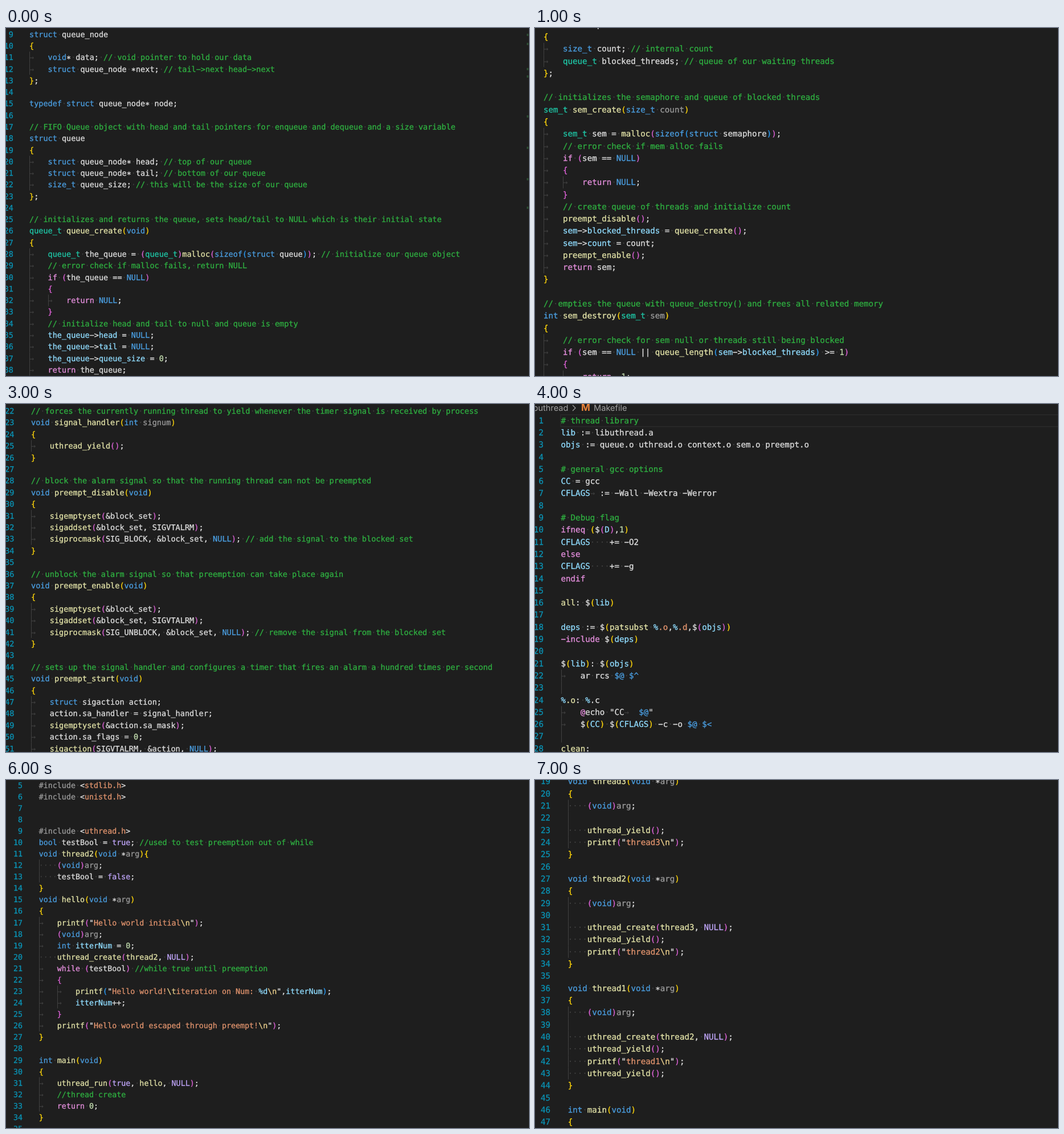
Animation, 918 px wide and 610 px high, one loop 8000 ms. Source, as an HTML page with a canvas:

```html
<!DOCTYPE html>
<html lang="en">
<head>
<meta charset="utf-8">
<title>Code slides</title>
<style>
html, body { margin: 0; width: 100%; height: 100%; overflow: hidden; background: #1e1e1e; }
canvas { display: block; }
</style>
</head>
<body>
<canvas id="stage" width="918" height="610"></canvas>
<script>
const ctx = document.getElementById('stage').getContext('2d');
const SLIDE_MS = 1000;

const color = {
  plain: '#dedede', comment: '#2fb041', keyword: '#4a9ddf', control: '#e58fdd', type: '#1fc6a6',
  call: '#e3e3a8', member: '#90dcfe', text: '#e0936d', escape: '#ecd08c', number: '#c2dcae',
  faded: '#9a9a9a', violet: '#bfa5f8', blank: '#414141', lineNo: '#0a93b5'
};
const brackets = ['#ffd60a', '#dc62d6', '#2a9cf5'];

// Ordered [style, pattern] pairs; the first match at a position wins.
const grammar = rules => ({
  styles: rules.map(rule => rule[0]),
  pattern: new RegExp(rules.map(rule => `(${rule[1].source})`).join('|'), 'g')
});

const cLang = grammar([
  ['comment', /\/\/.*/],
  ['string', /"[^"]*"/],
  ['text', /(?<=<)\w+\.h(?=>)/],
  ['faded', /#\w+|\barg\b/],
  ['control', /\b(?:if|else|while|for|return)\b/],
  ['keyword', /\b(?:struct|typedef|void|int|bool|static|sizeof|size_t)\b/],
  ['constant', /\b(?:NULL|true|false)\b/],
  ['type', /\b(?:queue_t|sem_t|sigset_t)\b/],
  ['call', /\b\w+(?=\()|\bthread\d\b|\bhello\b/],
  ['faded', /(?<=^\w.*)\b\w+(?=\)$)/],
  ['member', /\b\w+(?=->)|(?<=->)\w+|\bitterNum\b/],
  ['number', /\b\d+\b/],
  ['bracket', /[(){}]/],
  ['plain', /\w+|[^\w]/]
]);

const makeLang = grammar([
  ['comment', /#.*/],
  ['control', /^(?:ifneq|else|endif|-include)|@(?=echo)/],
  ['keyword', /\$[@^<]/],
  ['call', /^\w+(?=:)|(?<=^%)\.o|patsubst/],
  ['member', /^\w+|(?<=\$\()\w+|%/],
  ['text', /(?<=%)\.[od](?=,)/],
  ['number', /\b1\b/],
  ['bracket', /[()]/],
  ['plain', /\w+|[^\w]/]
]);

// In the listings an arrow stands for a tab.
const slides = [
  { first: 9, x: 41, numX: 13, y: 15.7, pitch: 20.28, cell: 8.13, lang: cLang, extra: drawMinimapEdge, code: String.raw`struct queue_node
{
→void* data; // void pointer to hold our data
→struct queue_node *next; // tail->next head->next
};

typedef struct queue_node* node;

// FIFO Queue object with head and tail pointers for enqueue and dequeue and a size variable
struct queue
{
→struct queue_node* head; // top of our queue
→struct queue_node* tail; // bottom of our queue
→size_t queue_size; // this will be the size of our queue
};

// initializes and returns the queue, sets head/tail to NULL which is their initial state
queue_t queue_create(void)
{
→queue_t the_queue = (queue_t)malloc(sizeof(struct queue)); // initialize our queue object
→// error check if malloc fails, return NULL
→if (the_queue == NULL)
→{
→→return NULL;
→}
→// initialize head and tail to null and queue is empty
→the_queue->head = NULL;
→the_queue->tail = NULL;
→the_queue->queue_size = 0;
→return the_queue;` },

  { x: 15, y: -1.2, pitch: 21.27, cell: 8.514, lang: cLang, code: String.raw`struct semaphore
{
→size_t count; // internal count
→queue_t blocked_threads; // queue of our waiting threads
};

// initializes the semaphore and queue of blocked threads
sem_t sem_create(size_t count)
{
→sem_t sem = malloc(sizeof(struct semaphore));
→// error check if mem alloc fails
→if (sem == NULL)
→{
→→return NULL;
→}
→// create queue of threads and initialize count
→preempt_disable();
→sem->blocked_threads = queue_create();
→sem->count = count;
→preempt_enable();
→return sem;
}

// empties the queue with queue_destroy() and frees all related memory
int sem_destroy(sem_t sem)
{
→// error check for sem null or threads still being blocked
→if (sem == NULL || queue_length(sem->blocked_threads) >= 1)
→{
→→return -1;` },

  { first: 48, x: 44, numX: 14.5, y: 19, pitch: 20.44, cell: 8.216, lang: cLang, code: String.raw`// yields out of curr_thread into next READY thread in thread_lib
void uthread_yield(void)
{
→struct uthread_tcb* current = curr_thread;
→preempt_disable();

→if(current->state == RUNNING)
→{
→→current->state = READY; // change state of the thread being switched out of to READY from RUNNING
→→queue_enqueue(thread_lib, curr_thread); // add the thread that was RUNNING to READY queue

→}

→prev_thread = current; // set prev thread to current
→queue_dequeue(thread_lib, (void**) &next_thread); // get the oldest thread
→curr_thread = next_thread;
→current = next_thread;
→current->state = RUNNING; // current thread is now running

→uthread_ctx_switch(prev_thread->context, current->context); // use private context.c function to switch threads

→// check if state is Zombie 
→if(current->state == ZOMBIE)
→{
→→free(current);
→}→
→preempt_enable();
}

// called at the end of a thread's context in that it reached the end of its code, marks curr_thread as zombie` },

  { first: 22, x: 44, numX: 14.5, y: 17, pitch: 20.4, cell: 8.18, lang: cLang, code: String.raw`// forces the currently running thread to yield whenever the timer signal is received by process
void signal_handler(int signum)
{
→uthread_yield();
}

// block the alarm signal so that the running thread can not be preempted
void preempt_disable(void)
{
→sigemptyset(&block_set);
→sigaddset(&block_set, SIGVTALRM);
→sigprocmask(SIG_BLOCK, &block_set, NULL); // add the signal to the blocked set
}

// unblock the alarm signal so that preemption can take place again
void preempt_enable(void)
{
→sigemptyset(&block_set);
→sigaddset(&block_set, SIGVTALRM);
→sigprocmask(SIG_UNBLOCK, &block_set, NULL); // remove the signal from the blocked set
}

// sets up the signal handler and configures a timer that fires an alarm a hundred times per second
void preempt_start(void)
{
→struct sigaction action;
→action.sa_handler = signal_handler;
→sigemptyset(&action.sa_mask);
→action.sa_flags = 0;
→sigaction(SIGVTALRM, &action, NULL);` },

  { first: 1, x: 45.5, numX: 15, y: 33.6, pitch: 21.3, cell: 8.54, lang: makeLang, extra: drawBreadcrumb, code: String.raw`# thread library
lib := libuthread.a
objs := queue.o uthread.o context.o sem.o preempt.o

# general gcc options
CC = gcc
CFLAGS→:= -Wall -Wextra -Werror

# Debug flag
ifneq ($(D),1)
CFLAGS    += -O2
else
CFLAGS    += -g
endif

all: $(lib)

deps := $(patsubst %.o,%.d,$(objs))
-include $(deps)

$(lib): $(objs)
→ar rcs $@ $^

%.o: %.c
→@echo "CC→$@"
→$(CC) $(CFLAGS) -c -o $@ $<

clean:` },

  { first: 12, x: 58, numX: 29, y: 13, pitch: 21.3, cell: 8.52, lang: cLang, macros: true, code: String.raw`void test_create(void)
{
→queue_t q = queue_create();
→assert(q != NULL);
}

void test_queue_simple(void)
{
→int data = 3, *ptr;
→queue_t q = queue_create();

→queue_enqueue(q, &data);
→queue_dequeue(q, (void**)&ptr);
→assert(ptr == &data);
}

void test_destroy(void)
{
→queue_t q = queue_create();
→assert(queue_destroy(q) == 0);
}

int main(void)
{
→test_create();
→test_queue_simple();
→test_destroy();
→return 0;
}` },

  { first: 5, x: 57.7, numX: 29, y: 13.6, pitch: 20.08, cell: 8.03, lang: cLang, macros: true, code: String.raw`#include <stdlib.h>
#include <unistd.h>


#include <uthread.h>
bool testBool = true; //used to test preemption out of while
void thread2(void *arg){
    (void)arg;
    testBool = false;
}
void hello(void *arg)
{
→printf("Hello world initial\n");
→(void)arg;
→int itterNum = 0;
    uthread_create(thread2, NULL);
→while (testBool) //while true until preemption
→{
→→printf("Hello world!\titeration on Num: %d\n",itterNum);
→→itterNum++;
→}
→printf("Hello world escaped through preempt!\n");
}

int main(void)
{
→uthread_run(true, hello, NULL);
→//thread create
→return 0;
}
` },

  { first: 19, x: 57.7, numX: 27, y: 7.3, pitch: 21.32, cell: 8.53, lang: cLang, macros: true, code: String.raw`void thread3(void *arg)
{
    (void)arg;

    uthread_yield();
    printf("thread3\n");
}

void thread2(void *arg)
{
    (void)arg;

    uthread_create(thread3, NULL);
    uthread_yield();
    printf("thread2\n");
}

void thread1(void *arg)
{
    (void)arg;

    uthread_create(thread2, NULL);
    uthread_yield();
    printf("thread1\n");
    uthread_yield();
}

int main(void)
{` }
];

function drawMinimapEdge() {
  ctx.fillStyle = '#2b4a31';
  for (const y of [12, 28, 72, 85, 155, 210, 265, 315]) ctx.fillRect(914, y - 2, 3, 4);
}

function drawBreadcrumb() {
  ctx.strokeStyle = '#2a2a2a';
  ctx.lineWidth = 1.5;
  ctx.strokeRect(45, 18.8, 900, 20.8);
  ctx.font = '14.6px Inter, sans-serif';
  ctx.fillStyle = '#a2a2a2';
  ctx.textAlign = 'right';
  ctx.fillText('libuthread', 58.5, 12);
  ctx.textAlign = 'left';
  ctx.fillText('Makefile', 103, 12);
  ctx.strokeStyle = '#a2a2a2';
  ctx.lineWidth = 1.2;
  ctx.stroke(new Path2D('M66 2 l5 5 l-5 5'));
  ctx.font = 'bold 17px Inter, sans-serif';
  ctx.fillStyle = '#e8823a';
  ctx.fillText('M', 81, 12);
}

// Wide hyphens and centred asterisks, as in the editor's typeface.
const glyphs = { '-': '\u2212', '*': '\u2217', ' ': '·' };

function drawGlyph(char, x, y, fill) {
  ctx.fillStyle = ctx.strokeStyle = fill;
  const glyph = glyphs[char] || char;
  ctx.fillText(glyph, x, y);
  if (char !== ' ' && char !== '→') ctx.strokeText(glyph, x, y);
}

function styleOfStringPart(part) {
  if (part === '"') return 'plain';
  return part[0] === '\\' ? 'escape' : part[0] === '%' ? 'member' : 'text';
}

// Splits a line into [text, colour] pieces; nesting carries bracket depth across lines.
function tokenize(line, slide, nesting) {
  const pieces = [];
  for (const match of line.matchAll(slide.lang.pattern)) {
    const token = match[0];
    const style = slide.lang.styles[match.slice(1).findIndex(group => group !== undefined)];
    if (style === 'string') {
      for (const part of token.match(/\\.|%\w|"|[^\\%"]+/g)) pieces.push([part, color[styleOfStringPart(part)]]);
    } else if (style === 'bracket') {
      const depth = '({'.includes(token) ? nesting.depth++ : --nesting.depth;
      pieces.push([token, brackets[depth % 3]]);
    } else if (style === 'constant') {
      pieces.push([token, slide.macros ? color.violet : color.keyword]);
    } else {
      pieces.push([token, color[style]]);
    }
  }
  return pieces;
}

function indentLevel(lines, row) {
  const own = line => line.match(/^(?:→| {4})*/)[0].replace(/ {4}/g, '→').length;
  if (lines[row]) return own(lines[row]);
  const above = own(lines.slice(0, row).reverse().find(Boolean) || '');
  const below = own(lines.slice(row).find(Boolean) || '');
  return Math.min(above, below) + (above !== below ? 1 : 0);
}

function drawSlide(slide) {
  const { x, y, pitch, cell, numX, first } = slide;
  const lines = slide.code.split('\n');
  const nesting = { depth: 0 };
  ctx.fillStyle = '#1e1e1e';
  ctx.fillRect(0, 0, 918, 610);
  if (slide.extra) slide.extra();

  ctx.font = `${cell / 0.602}px "DejaVu Sans Mono", monospace`;
  ctx.textRendering = 'geometricPrecision';
  ctx.lineWidth = 0.3;
  lines.forEach((line, row) => {
    const base = y + row * pitch;
    ctx.fillStyle = color.blank;
    for (let level = 0; level < indentLevel(lines, row); level++) {
      ctx.fillRect(Math.round(x + level * 4 * cell), base - 4.7 - pitch / 2, 1, pitch);
    }
    if (first) {
      const label = String(first + row);
      [...label].forEach((digit, i) =>
        drawGlyph(digit, numX - (label.length - i) * cell, base, color.lineNo));
    }
    let column = 0;
    for (const [token, fill] of tokenize(line, slide, nesting)) {
      for (const char of token) {
        const isBlank = char === ' ' || char === '→';
        drawGlyph(char, x + column * cell, base, isBlank ? color.blank : fill);
        column = char === '→' ? (Math.floor(column / 4) + 1) * 4 : column + 1;
      }
    }
  });
}

let shown = -1;
function tick() {
  const index = Math.floor(performance.now() / SLIDE_MS) % slides.length;
  if (index !== shown) drawSlide(slides[shown = index]);
  requestAnimationFrame(tick);
}
tick();
</script>
</body>
</html>
```
